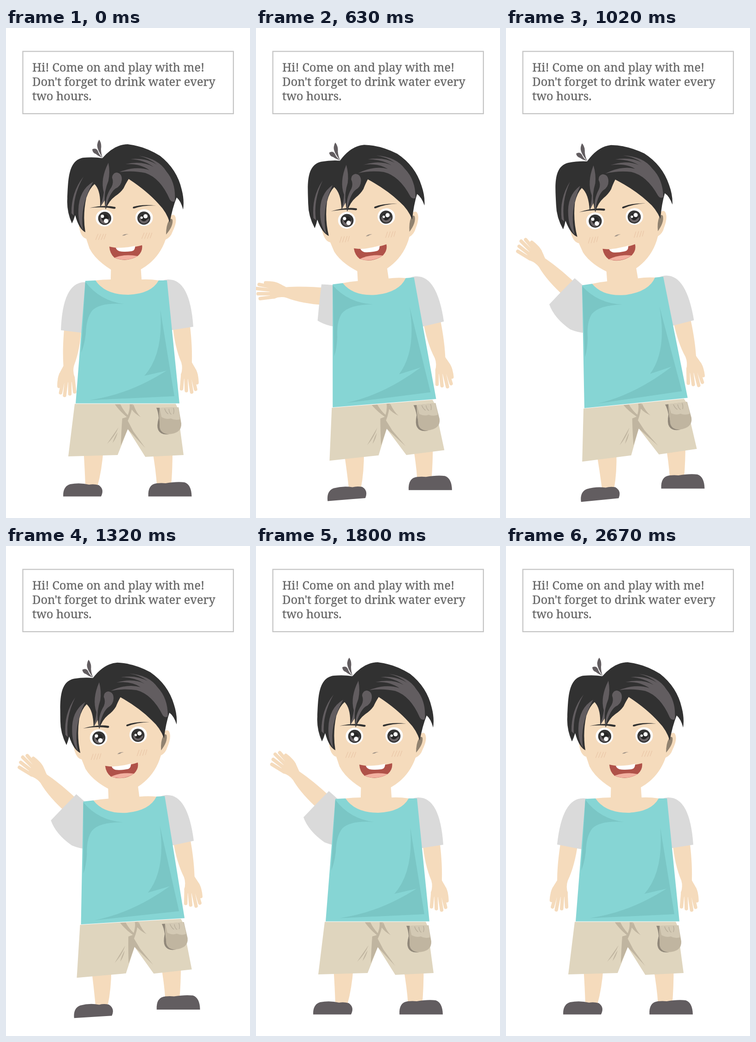
Animation, 529 px wide and 1058 px high, one loop 2700 ms. Source, as an HTML page:

```html
<!DOCTYPE html>
<html lang="en">
<head>
<meta charset="utf-8">
<title>Waving boy</title>
<style>
html, body { margin: 0; width: 100%; height: 100%; overflow: hidden; background: #fff; }
svg { display: block; width: 100vw; height: 100vh; }
text { font: 500 25.35px "Noto Serif", serif; fill: #686868; stroke: #686868; stroke-width: .4px; }
.skin { fill: #f5dbbc; }
.hair { fill: #313131; }
.grey { fill: #625d60; }
.sleeve { fill: #dadada; }
.fold { fill: #7ac6c5; }
.crease { fill: #c0b5a0; }
.line { fill: none; stroke-linecap: round; }
</style>
</head>
<body>
<svg viewBox="0 0 529 1058">
  <defs>
    <g id="arm">
      <path class="skin" d="M398 635C401 660 404 690 403 722C409 733 414 739 416 750L408 759L383 757L379 749Q384 735 380 722Q366 690 361 640Z"/>
      <path class="line" stroke="#f5dbbc" stroke-width="7.5" d="M383 748L380.500 779M390 750L391 783M397 750L402.500 786M404 750L411 780M409 740Q414 752 414 766"/>
      <path class="sleeve" d="M406 645Q399 543 352 543Q322 543 311 588Q310 630 328 656.500L361 652Z"/>
    </g>
    <g id="cheek">
      <path class="line" stroke="#eac7a8" stroke-width="1.300" d="M0 12L5 0M6 12L11 0M12 12L17 0M18 11L22 0"/>
    </g>
  </defs>

  <rect x="36.500" y="50.500" width="456.500" height="134.500" fill="none" stroke="#c3c3c3" stroke-width="2.200"/>
  <text x="57" y="94">Hi! Come on and play with me!</text>
  <text x="57" y="125">Don't forget to drink water every</text>
  <text x="57" y="155.500">two hours.</text>

  <g id="wave">
    <use href="#arm" transform="translate(-2 6) rotate(-2 170 560) translate(524 0) scale(-1 1)"/>
  </g>

  <g id="leg">
    <path class="skin" d="M317 910H361Q361 955 358 988H327Q325 955 317 910Z"/>
    <path class="grey" d="M308.500 1011.500Q307 985 327 983Q337 982 346 983Q370 979 387 981Q402 986 402.500 1011.500Z"/>
  </g>

  <g id="body">
    <path class="skin" d="M168 910H211Q208 955 198 990H172Q171 955 168 910Z"/>
    <path class="grey" d="M124 1011.500Q123 990 139 985Q160 981 180 986Q190 984 201 987Q214 996 206 1011.500Z"/>
    <use href="#arm"/>

    <!-- shorts -->
    <path fill="#dfd5be" d="M149 811.500H368L371 818L385 922L302 926L264 866L242 922L135 925Z"/>
    <path class="crease" d="M236 812.500H248Q255 827 264 836Q269 823 268 812.500H275Q272 832 264 848L276 871L302 907L264 866L249 901Q250 868 252 843L262 840Q246 827 236 812.500ZM244 862Q236 882 219 898Q230 882 244 862ZM242 873Q239 886 231 896Q235 883 242 873ZM276 812.500Q283 832 292 840Q279 833 272 823ZM268 857Q279 878 285 886Q275 878 268 857Z"/>
    <path fill="#91887a" d="M326 820L333 820Q331 845 335 865Q341 875 354 877Q336 880 330 868Q326 860 331 842Q330 829 326 820Z"/>
    <path class="crease" d="M333 820L374 819L380 854Q381 876 351 877Q335 875 333 862Z"/>
    <path fill="#d3c9b4" d="M333 820L373 819Q377 836 377 845Q367 848 357 843Q348 846 337 840Z"/>
    <path class="line" stroke="#b5ab98" stroke-width="1.300" d="M344 822Q346 829 351 833M353 823Q354 831 358 834M363 821Q365 827 363 833"/>

    <!-- neck and shirt -->
    <path class="skin" d="M228 500L227 543Q210 543 194 545V580H331V545Q312 542 294 543L291 500Z"/>
    <path fill="#86d5d4" d="M172 546L194 545Q215 576 265 576Q315 574 331 545L349 545L376 810.500H151Z"/>
    <path class="fold" d="M172 548Q203 589 256 596Q205 592 187 610Q174 626 173 660Q170 685 163 701ZM334.500 608L365 795L181 803.500Q265 792 348 740L300 751Q342 704 334.500 608Z"/>

    <!-- head -->
    <path class="skin" d="M158 425Q161 452 174 455L181 476Q194 501 228 522Q260 534 291 522Q331 500 346 457Q357 452 361 440Q373 416 366 405Q361 401 354 408L340 320H185L165 400Z"/>
    <path fill="#908270" d="M353 416Q358 409 361 414Q363 428 347 446Q347 427 353 416Z"/>
    <path class="hair" d="M181 388.500Q214 381 237 386.500Q239 390 235 390.500Q212 385 181 388.500ZM326 383.500Q295 380 276 386Q273 390 278 389.500Q298 382.500 326 383.500Z"/>
    <g>
      <ellipse cx="213.500" cy="410.500" rx="19" ry="18" fill="#fff"/>
      <circle cx="214" cy="411" r="14.200" fill="#353535"/>
      <path d="M204 408Q202 421 214 423Q223 422 225 411Q216 418 204 408Z" fill="#6b6568"/>
      <circle cx="214.500" cy="410" r="7.500" fill="#262626"/>
      <circle cx="209" cy="406.500" r="3.600" fill="#fff"/>
      <circle cx="217" cy="416.500" r="4.800" fill="#fff"/>
    </g>
    <g>
      <ellipse cx="299.500" cy="409.500" rx="19" ry="18" fill="#fff"/>
      <circle cx="299" cy="410.500" r="14.200" fill="#353535"/>
      <path d="M288 409Q289 421 299 422Q309 421 311 411Q300 419 288 409Z" fill="#6b6568"/>
      <circle cx="299" cy="410" r="7.500" fill="#262626"/>
      <circle cx="302.500" cy="406.500" r="4.600" fill="#fff"/>
      <circle cx="294" cy="409.500" r="2.700" fill="#fff"/>
    </g>
    <path fill="#a3968a" d="M252 448.500Q256 443.500 266 445Q259 446 258 448Z"/>
    <use href="#cheek" x="194.500" y="445"/>
    <use href="#cheek" x="294.500" y="442.500"/>
    <path fill="#b05249" d="M224 472Q245 477 262 474Q282 473 295 469Q297 482 286 492Q262 507 235 496Q225 487 224 472Z"/>
    <path fill="#fff" d="M238 474.500Q260 475 280 470.500Q280 481 272 482Q257 484 246 482Q240 480 238 474.500Z"/>
    <path fill="#f3b0a0" d="M235 496Q258 487 285 492.500Q262 506 235 496Z"/>

    <!-- hair -->
    <path class="hair" d="M143 422Q131 395 133 368C135 330 134 285 168 280Q190 278 209 281Q235 251 264 251Q300 255 334 276Q371 305 381 349Q387 372 384 392Q379 373 370 366Q361 388 355 420Q348 397 331 380Q306 352 266 326Q259 337 255 346Q248 356 237 363Q223 373 216 392Q214 382 214 372L204 387Q206 351 192 337Q181 346 174 367Q166 405 172 441Q158 434 150 404Q147 414 143 422Z"/>
    <path class="grey" d="M168 321Q141 355 142 400L147 405Q144 363 168 321ZM189 332Q158 350 157 393Q156 420 167 436Q159 385 189 332ZM222 291Q204 326 212 355Q210 371 204 386L214 372Q213 352 222 330Q226 311 222 291ZM240 312Q252 314 251 328Q250 341 237 347Q224 357 216 389Q214 365 229 343Q234 333 230 323Q231 313 240 312Z"/>
    <path class="grey" d="M288 276Q331 282 348 310Q369 335 366 374Q359 377 355 370Q335 324 302 313Q275 307 246 311Q282 297 311 307Q290 292 259 294Q295 286 320 300Q300 285 270 283Q304 280 327 295Q311 281 288 276Z"/>
    <path class="grey" d="M202 241Q208 249 206 261Q206 272 210 281Q196 261 198 251Q199 245 202 241ZM187 262Q195 258 199 265Q202 274 209 280Q199 276 195 272Q188 270 187 262Z"/>
  </g>
</svg>
<script>
const LOOP = 2700, STEP = 900;
// body tilt, leg x, leg y, arm centre x, arm centre y, arm angle
const poses = [
  [0, 0, 0, 161.5, 672.3, 0],
  [-6.5, 32, -19.6, 106, 563.5, 128],
  [0, 2.5, 0, 116.4, 550.8, 128],
  [0, 2.5, 0, 153, 671, 0]
];
const [body, leg, wave] = ["body", "leg", "wave"].map(id => document.getElementById(id));
const put = (el, value) => el.setAttribute("transform", value);

function draw(now) {
  const t = now % LOOP / STEP, i = Math.floor(t), u = t - i;
  const [tilt, lx, ly, ax, ay, turn] = poses[i].map((a, n) => a + (poses[i + 1][n] - a) * u);
  put(body, `rotate(${tilt} 264 623)`);
  put(leg, `translate(${lx} ${ly})`);
  put(wave, `translate(${ax} ${ay}) rotate(${turn}) translate(-161.5 -672.3)`);
}

const start = performance.now();
function tick() {
  draw(performance.now() - start);
  requestAnimationFrame(tick);
}
tick();
</script>
</body>
</html>
```
